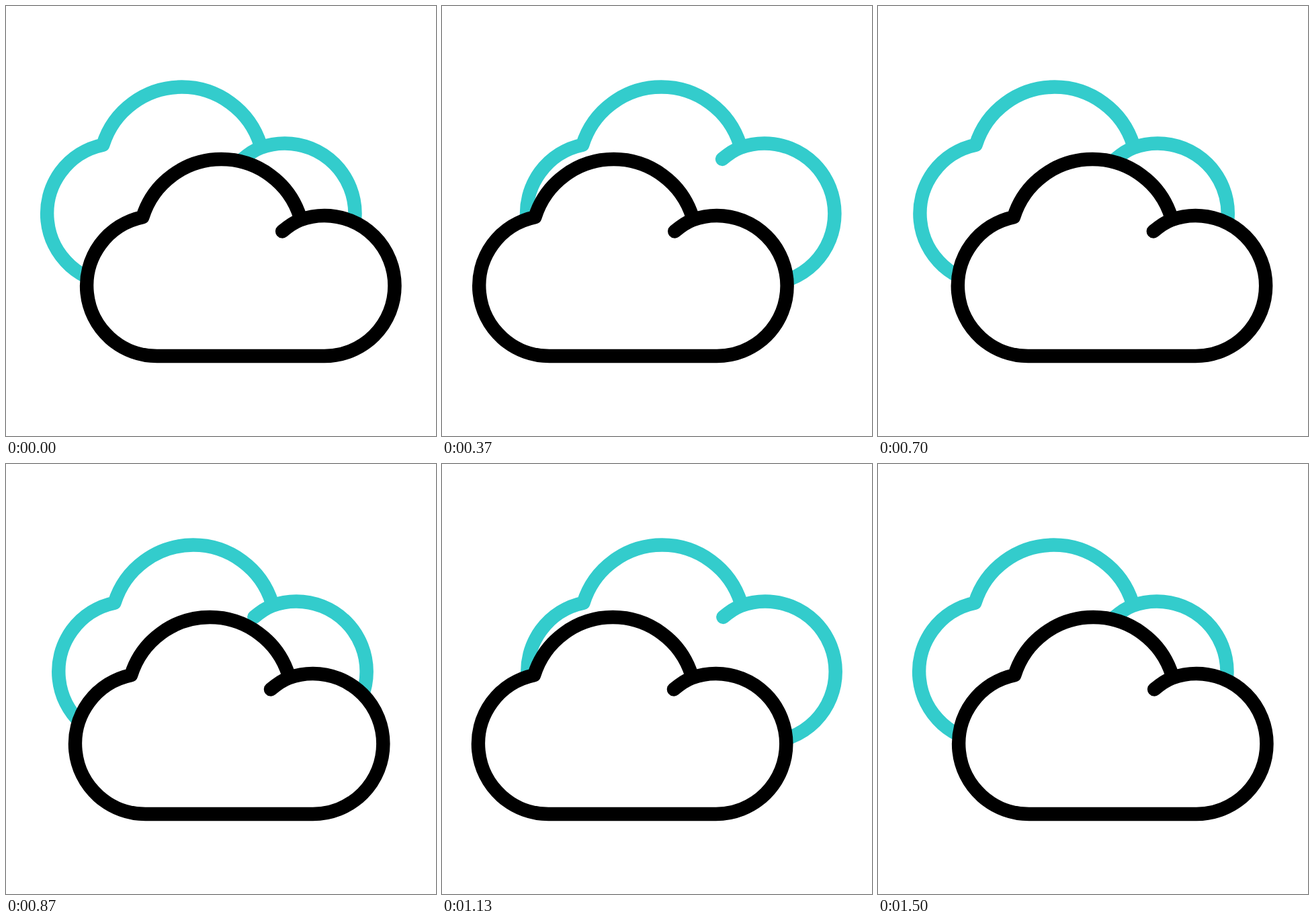
Animation, 640 px wide and 640 px high, one loop 1.67 s. Source, as an HTML page:

```html
<!DOCTYPE html>
<html lang="en">
<head>
<meta charset="utf-8">
<title>Drifting clouds</title>
<style>
  html, body { margin: 0; height: 100%; overflow: hidden; background: #fff; }
  svg { display: block; width: 100vw; height: 100vh; }
  use { fill: #fff; stroke-width: 20.5; stroke-linecap: round; stroke-linejoin: round; }
</style>
</head>
<body>
<svg viewBox="0 0 640 640">
  <defs>
    <path id="cloud" d="M411.2 335.4 Q426 322.8 438 318.3 A104.5 104.5 0 0 1 474 312
      A104.5 104.5 0 0 1 474 521 H225 A104.5 104.5 0 0 1 203.3 314.2 A122.8 122.8 0 0 1 437.7 314.2"/>
  </defs>
  <use id="back" href="#cloud" stroke="#33cccc"/>
  <use id="front" href="#cloud" stroke="#000"/>
</svg>
<script>
  const LOOP = 1670, FPS = 30, TRAVEL = 66.2;
  // Frames at which the clouds turn round: home, away, home, away, home.
  const TURNS = [1, 10, 22, 34, 45];
  const back = document.getElementById('back');
  const front = document.getElementById('front');

  const smooth = s => s * s * (3 - 2 * s);

  function shiftAt(frame) {
    if (frame <= TURNS[0] || frame >= TURNS[4]) return 0;
    const leg = TURNS.findIndex(turn => frame < turn) - 1;
    const s = smooth((frame - TURNS[leg]) / (TURNS[leg + 1] - TURNS[leg]));
    return TRAVEL * (leg % 2 ? 1 - s : s);
  }

  function draw(now) {
    // Frame starts fall on rounded 10 ms ticks, so allow a few ms of lead.
    const frame = Math.floor((now % LOOP + 3.4) * FPS / 1000);
    const shift = shiftAt(frame);
    back.setAttribute('transform', `translate(${shift - 59} -107.5)`);
    front.setAttribute('transform', `translate(${-shift} 0)`);
    requestAnimationFrame(draw);
  }
  draw(performance.now());
</script>
</body>
</html>
```
